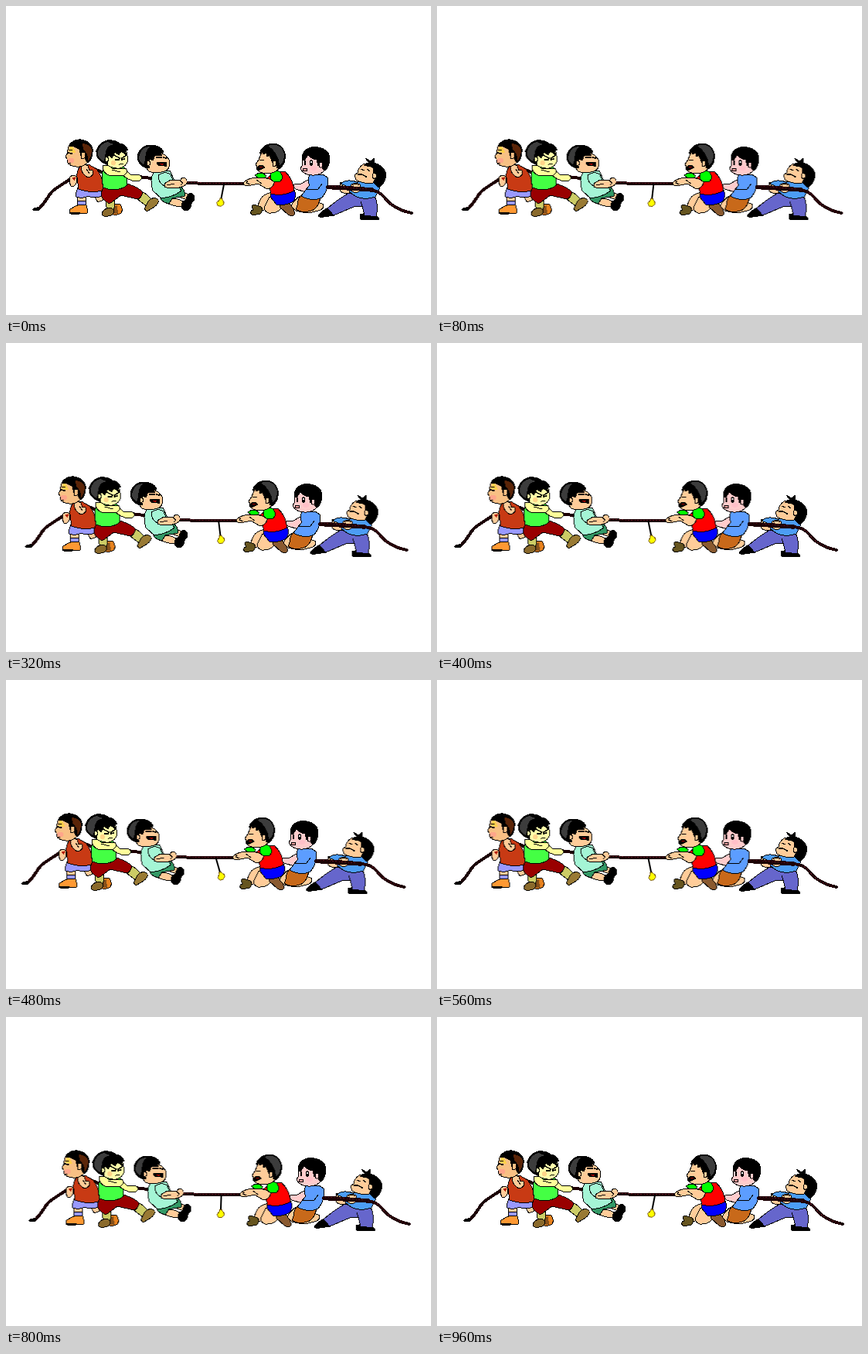
Recreate the animation shown at these times as an HTML page. Size 550 px wide and 400 px high, loop 1040 ms.

```html
<!DOCTYPE html>
<html lang="en">
<head>
<meta charset="utf-8">
<title>Tug of war</title>
<style>
html, body { margin: 0; width: 100%; height: 100%; overflow: hidden; background: #fff; }
svg { display: block; width: 100%; height: 100%; shape-rendering: crispEdges; }
path, ellipse { stroke: #000; stroke-width: 1; stroke-linejoin: round; stroke-linecap: round; }
.n { stroke: none; }
.l { fill: none; }
.b { fill: none; stroke-width: 1.6; }
.k { fill: #000; }
.g { fill: #3c3c3c; stroke: none; }
.rope { fill: none; stroke: #1c0004; stroke-width: 4; }
.thick { stroke-width: 5.5; }
.twist { fill: none; stroke: #5c1420; stroke-dasharray: 1 3; }
/* --s is how far a part slides on each tick */
.pull { animation: pull 1040ms infinite; }
.swing { transform-origin: 282px 231px; animation: swing 1040ms infinite; }
@keyframes pull {
  0% { transform: translateX(0); animation-timing-function: steps(6); }
  46.1538% { transform: translateX(calc(var(--s) * -6)); animation-timing-function: steps(7); }
  100% { transform: translateX(var(--s)); }
}
@keyframes swing {
  0% { transform: rotate(11deg); animation-timing-function: steps(6); }
  46.1538% { transform: rotate(-16deg); animation-timing-function: steps(7); }
  100% { transform: rotate(15.5deg); }
}
</style>
</head>
<body>
<svg viewBox="0 0 550 400">
  <!-- rope behind the team -->
  <g class="pull" style="--s:2.4px">
    <path class="rope" d="M37 263 L43 262 Q49 256 54 248 Q58 240 68 234 L88 221 M110 209 L126 216 M172 221 L188 223"/>
    <path class="k" d="M34.500 264 L38 261 L44 261 L42 264.500Z"/>
    <path class="rope" d="M225 228.500 Q266 231 312 230"/>
    <path class="twist" d="M232 228 Q266 230 306 229"/>
  </g>
  <g class="pull" style="--s:1.7px">
    <g class="swing">
      <path class="b" d="M282 231 V249"/>
      <path fill="#ff0" style="stroke:#750" d="M280.500 249 L283.500 249 L284 251 Q287 253 286 257 L283 260 L279 259 L277.500 256 L280 252Z"/>
    </g>
  </g>

  <!-- first boy, left -->
  <g class="pull" style="--s:2.3px">
    <path fill="#fc9" d="M114 246 L124 244 L126 251 L119 254Z"/>
    <path fill="#fc9" d="M92 246 L103 247 L103 260 L93 260Z"/>
    <path fill="#99f" d="M92 253 L103 252 L103 259 L92 259Z"/>
    <path fill="#f93" d="M90 259 Q97 256 104 258 Q106 263 105 268 L85 270 Q81 267 83 263Z"/>
    <path class="b" d="M83 268 L104 268.500"/>
    <path fill="#99f" d="M93 235 Q90 242 91 247 Q99 250 106 246 Q116 250 124 246 L126 236Z"/>
    <path fill="#c83a14" d="M97 206 Q91 213 92 222 L94 237 Q109 243 124 239 L127 236 Q124 218 117 211 L107 205Z"/>
    <path fill="#fc9" d="M83 221 Q88 217 92 222 L91 229 Q88 236 84 233 Q81 227 83 221Z"/>
    <path class="n" fill="#b41c00" d="M85 223 L90 221 L89 227Z"/>
    <path fill="#fc9" d="M97 208 Q102 204 106 207 L108 213 Q113 211 113 217 Q110 222 106 222 Q97 217 97 208Z"/>
    <path class="l" d="M104 211 L108 217"/>
    <path fill="#f8c084" d="M83 179 Q79 184 80 190 L77 195 L79 198 Q78 205 86 207 Q98 211 106 202 L107 184Z"/>
    <ellipse class="n" cx="84" cy="200" rx="4" ry="3.500" fill="#ffa58a"/>
    <path class="n" fill="#ffd04a" d="M83 181 Q89 183 90 190 L82 189Z"/>
    <path fill="#000" d="M81 181 Q87 172 97 173 Q110 175 112 185 Q113 197 106 203 L102 198 Q104 192 100 189 L97 194 L95 186 Q90 181 81 181Z"/>
    <path class="n" fill="#5b2508" d="M99 178 Q111 179 111 188 Q110 197 106 201 Q107 191 100 186Z"/>
    <path fill="#f8c084" d="M97 191 Q100 188 103 191 Q103 198 98 198Z"/>
    <path class="b" d="M80 190 L85 191"/>
    <path class="l" d="M81 186 L86 187 M80 204 L84 203"/>
  </g>

  <!-- second boy, left -->
  <g class="pull" style="--s:2.35px">
    <path fill="#e8821e" d="M138 259 Q143 255 148 257 Q152 263 149 268 Q146 271 139 270Z"/>
    <path class="n" fill="#86501a" d="M139 260 L144 258 L145 269 L139 269Z"/>
    <path fill="#cc6" d="M128 247 L140 250 Q142 257 139 264 L131 266Z"/>
    <path fill="#8a6a2c" d="M126 265 Q131 260 137 262 Q142 265 138 270 Q134 273 127 272 Q122 270 126 265Z"/>
    <path fill="#cc6" d="M168 241 L178 241 Q188 248 191 256 L182 259 L170 250Z"/>
    <path fill="#997a34" d="M184 253 Q191 245 197 251 Q198 256 192 260 L184 265 Q179 266 180 261Z"/>
    <path fill="#900" d="M126 233 L157 230 Q172 235 177 241 Q175 249 170 250 L149 245 L134 256 Q124 251 123 244Z"/>
    <path fill="#4f4" d="M127 208 Q122 222 126 235 Q143 242 157 232 Q157 219 153 209Z"/>
    <path fill="#ff9" d="M151 211 Q158 214 161 218 L173 219 Q178 222 173 226 L163 226 Q152 222 149 216Z"/>
    <path fill="#ff9" d="M125 207 Q133 204 138 211 L155 210 Q159 215 153 219 L137 220 Q126 219 125 207Z"/>
    <path class="l" d="M137 212 L148 215"/>
    <path fill="#ffa" d="M129 187 Q125 198 130 205 Q138 211 147 210 Q156 208 158 199 L155 184Z"/>
    <ellipse class="n" cx="139" cy="203" rx="3.500" ry="3" fill="#ffd58a"/>
    <path fill="#000" d="M128 204 Q116 199 117 187 Q121 176 131 174 Q141 173 147 178 Q155 179 158 187 L154 186 L156 193 L149 188 L146 193 L141 189 L137 197 L133 193 Q130 198 132 204Z"/>
    <path class="g" d="M119 189 Q121 178 132 176 L139 179 Q130 181 129 189 L127 201 Q118 197 119 189Z"/>
    <path fill="#ffa" d="M128 196 Q132 194 133 199 Q131 203 128 200Z"/>
    <path class="b" d="M140 193 L147 197 M156 193 L150 197 M142 199 L146 199 M150 199 L153 198"/>
    <path class="l" d="M146 206 Q149 203 152 205"/>
  </g>

  <!-- third boy, left -->
  <g class="pull" style="--s:2.25px">
    <path fill="#fc9" d="M205 250 L218 249 Q229 251 233 257 L226 260 Q216 259 205 254Z"/>
    <path fill="#fc9" d="M228 240 L238 245 L235 251 L226 248Z"/>
    <path class="k" d="M233 249 Q236 241 241 243 Q246 247 243 252 L237 256Z"/>
    <path class="k" d="M229 253 Q234 249 240 253 Q241 259 236 264 L230 264 Q225 260 229 253Z"/>
    <path fill="#396" d="M199 247 L224 233 Q233 237 231 246 L215 249 L211 256 Q201 254 199 247Z"/>
    <path fill="#a4f5d5" d="M192 214 Q185 224 190 239 L201 249 Q217 247 227 239 L219 228 L212 213Z"/>
    <path fill="#a4f5d5" d="M197 219 Q207 213 213 218 L216 226 L205 233 Q197 229 197 219Z"/>
    <path fill="#fc9" d="M205 230 L213 225 L226 225 L228 222 Q235 222 234 229 Q233 233 224 235 Q211 237 205 234Z"/>
    <path class="l" d="M225 226 L229 229 L226 232 M208 232 L218 230"/>
    <path fill="#fc9" d="M183 196 Q178 208 185 214 Q194 218 205 214 Q213 211 211 204 L212 200 L206 193 L197 188Z"/>
    <path fill="#000" d="M183 210 Q171 207 170 196 Q172 181 187 180 Q200 180 204 189 L199 189 L202 194 L193 193 L190 200 L186 198 Q182 203 186 209Z"/>
    <path class="g" d="M172 196 Q174 183 186 182 Q180 188 180 200 L178 205 Q172 202 172 196Z"/>
    <path fill="#fc9" d="M182 201 Q186 199 187 204 Q185 208 182 205Z"/>
    <path class="k" d="M195 203 Q202 201 208 203 L207 208 L203 206 Q197 208 195 203Z"/>
    <path class="n" fill="#a00" d="M198 204 L205 204 L202 206Z"/>
    <path class="b" d="M195 196 L201 196 M204 196 L207 197"/>
  </g>

  <!-- fourth boy, right -->
  <g class="pull" style="--s:2.3px">
    <path fill="#fc9" d="M346 241 Q332 243 329 251 L325 260 L333 265 Q338 258 351 256Z"/>
    <path fill="#66551f" d="M320 264 Q316 258 321 257 L330 260 Q334 264 329 269 L319 271 Q315 268 318 264Z"/>
    <path fill="#fc9" d="M341 247 Q350 249 355 254 L357 261 Q351 269 340 268 Q333 266 335 259Z"/>
    <path fill="#8a5a30" d="M356 256 Q366 253 371 260 L374 269 Q371 274 365 270 L354 260Z"/>
    <path fill="#00f" d="M343 242 L372 236 Q377 245 372 253 Q362 259 350 257L342 247Z"/>
    <path fill="#f00" d="M338 223 L348 214 L361 214 Q372 225 373 239 Q358 247 343 243Z"/>
    <path fill="#0f0" d="M322 219 Q330 213 337 220 L331 226Z"/>
    <path fill="#fc9" d="M324 222 L334 222 L348 226 Q346 236 338 237 L326 230 L313 233 Q306 233 308 228 Q313 223 324 222Z"/>
    <path class="l" d="M313 226 L311 229 L316 231 M324 225 L331 230"/>
    <path fill="#0f0" d="M343 217 Q350 211 355 215 Q360 222 355 227 L347 228 Q340 224 343 217Z"/>
    <path fill="#fc9" d="M331 189 L327 199 L323 205 L325 208 Q323 214 332 216 Q344 219 353 211 L349 188Z"/>
    <path fill="#000" d="M328 191 Q331 180 344 178 Q358 178 361 191 Q363 203 354 211 L350 209 Q352 203 348 200 L345 203 L341 193 L338 195 L337 190 L332 192 L332 189Z"/>
    <path class="g" d="M339 181 Q356 176 360 192 Q360 202 354 207 Q353 190 339 181Z"/>
    <path fill="#fc9" d="M345 201 Q350 199 350 204 Q349 209 345 207Z"/>
    <path class="k" d="M325 210 Q329 203 335 209 Q331 211 327 213Z"/>
    <path class="n" fill="#a00" d="M328 209 Q330 206 333 209Z"/>
    <path class="l" d="M328 199 L334 200"/>
  </g>

  <!-- fifth boy, right -->
  <g class="pull" style="--s:2.5px">
    <path fill="#fc9" d="M380 246 Q372 252 369 259 L375 265 Q391 270 404 265 Q412 263 411 257 L399 252Z"/>
    <path fill="#c8691a" d="M382 245 Q377 250 378 256 L375 263 Q382 268 391 266 Q404 265 407 247Z"/>
    <path fill="#fcc" d="M391 225 L382 230 L374 230 Q370 233 375 237 L388 241 L399 235Z"/>
    <path fill="#5c9dff" d="M393 219 Q389 226 393 232 L387 239 L382 246 Q396 254 409 248 Q419 236 416 222 L410 218Z"/>
    <path class="l" d="M389 237 L404 237 L409 230"/>
    <path fill="#fcc" d="M388 193 Q382 201 384 206 L381 210 Q383 216 390 218 Q405 222 413 212 L412 195Z"/>
    <path fill="#000" d="M383 199 Q383 186 395 183 Q409 181 417 190 Q422 203 413 213 L409 210 Q412 204 407 201 L404 207 L402 199 Q394 198 391 192 L387 199Z"/>
    <path fill="#fcc" d="M405 203 Q410 201 410 206 Q408 211 405 208Z"/>
    <ellipse class="k" cx="395" cy="203" rx="1.700" ry="3.500"/>
    <ellipse class="k" cx="387" cy="203" rx=".8" ry="2.500"/>
    <path class="n" fill="#fff" d="M394 201h1.500v1.500h-1.500z"/>
    <ellipse cx="387" cy="212" rx="2.500" ry="2" fill="#e89a9a"/>
    <ellipse class="n" cx="398" cy="210" rx="4" ry="3" fill="#ffc0c8"/>
  </g>

  <!-- sixth boy, right -->
  <g class="pull" style="--s:2.6px">
    <path class="k" d="M422 260 Q413 261 404 271 Q404 274 411 273 L425 271Z"/>
    <path class="k" d="M458 270 Q466 267 476 271 Q484 273 483 277 L459 276Z"/>
    <path fill="#66c" d="M444 242 Q428 251 416 262 L424 271 L450 260 L461 259 L464 271 L479 273 Q483 256 476 244Z"/>
    <path class="l" d="M461 259 L459 253"/>
    <path fill="#4c9df5" d="M448 229 L444 240 Q458 254 478 247 L484 235 Q480 227 470 226Z"/>
    <path fill="#fc9" d="M432 229 Q438 226 446 232 L444 243 Q435 243 432 239Z"/>
    <path fill="#4c9df5" d="M433 230 Q441 223 455 228 L447 236Z"/>
    <path fill="#fc9" d="M462 205 Q455 210 455 216 L451 219 L453 225 Q463 231 475 229 L483 217 L476 204Z"/>
    <path fill="#000" d="M463 207 Q466 203 470 203 L465 197 L472 201 L476 197 L476 203 Q489 206 492 218 Q491 229 483 235 Q476 231 476 226 L480 222 Q479 217 475 217 L476 210 Q470 206 463 207Z"/>
    <path fill="#fc9" d="M475 217 Q480 216 480 221 Q477 225 474 222Z"/>
    <path class="b" d="M456 218 Q461 217 466 221"/>
    <path class="l" d="M459 211 L464 213 M467 211 L471 214"/>
    <path fill="#fc9" d="M447 231 Q452 227 458 231 L459 239 Q452 244 446 239Z"/>
  </g>

  <!-- tail of the rope, over the last boy -->
  <g class="pull" style="--s:2.5px">
    <path class="rope thick" d="M417 234.500 L446 236 L474 238"/>
    <path class="twist" d="M418 233 L446 235 L470 237"/>
  </g>
  <g class="pull" style="--s:1.6px">
    <path class="rope" d="M470 238 Q483 239 490 248 Q501 263 525 268"/>
    <path class="twist" d="M472 238 Q483 239 490 248 Q501 263 523 267"/>
  </g>
  <g class="pull" style="--s:2.6px">
    <path class="l" d="M448 232 Q452 229 457 232 M434 233 L438 231"/>
  </g>
</svg>
</body>
</html>
```
